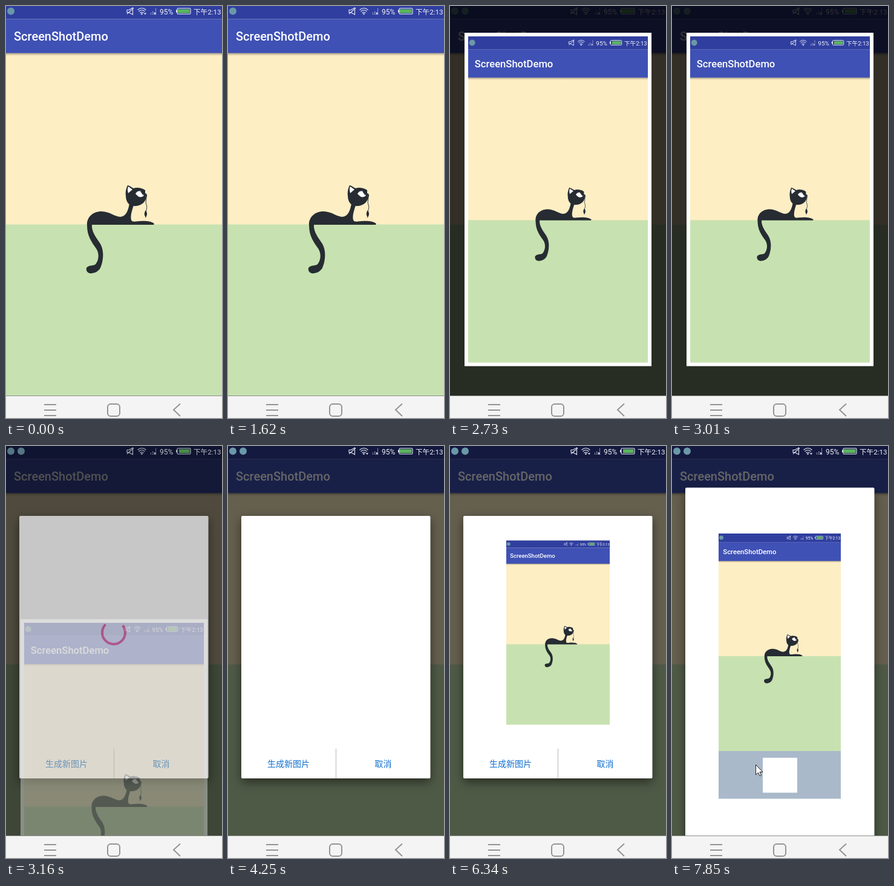
An HTML page that plays this animation: 357x678 px, repeating every 8 s.

```html
<!DOCTYPE html>
<html lang="zh">
<head>
<meta charset="utf-8">
<title>ScreenShotDemo</title>
<style>
  html, body { margin: 0; width: 100%; height: 100%; overflow: hidden; background: #f4f4f4; }
  svg { display: block; }
  text { font-family: Roboto, "Noto Sans CJK SC", "Noto Sans CJK", sans-serif; }
  .title { font-size: 20px; font-weight: 500; fill: #fff; }
  .small { font-size: 12px; fill: #f2f3fa; }
  .btn { font-size: 14px; fill: #0f6fd0; text-anchor: middle; }
  .line { fill: none; stroke: #e8eaf6; stroke-width: 1.1; }
  .nav { fill: none; stroke: #949494; stroke-width: 2; }
  #card { fill: #fff; filter: drop-shadow(0 6px 8px rgba(0, 0, 0, .5)); }
</style>
</head>
<body>
<svg width="357" height="678" viewBox="0 0 357 678">
  <defs>
    <linearGradient id="fade" x2="0" y2="1">
      <stop offset="0" stop-opacity=".32"/>
      <stop offset="1" stop-opacity="0"/>
    </linearGradient>

    <!-- The screen starts 4px above the stage; its screenshots show that strip. -->
    <g id="app">
      <rect y="-4" width="357" height="645" fill="#feeec4"/>
      <rect y="359.5" width="357" height="281.5" fill="#c7e2b0"/>
      <rect y="-4" width="357" height="25.5" fill="#303f9f"/>
      <rect y="21.5" width="357" height="56" fill="#3f51b5"/>
      <rect y="77.5" width="357" height="4.5" fill="url(#fade)"/>
      <text class="title" x="13" y="57">ScreenShotDemo</text>
      <g fill="#262c32">
        <path d="M134 361C133 348 143 338 158 338C171 338 180 347 189 347C199 346 202 336 204 325L212 325C209 334 205 345 207 352C208 355 211 355 215 354.5C228 353 241 354 245 358.500L244 360L142 360C141 371 149 381 155 390C163 402 161 420 156 431C152 438 145 440 139 440C134 439 132 435 133 431C136 426 144 428 148 425C153 419 155 408 149 399C142 389 134 379 134 361Z"/>
        <path d="M198 312C197 306 199 299 201 295C205 296 208 299 211 300C216 298 224 299 230 303L230 308C235 310 233 314 231 318C228 326 219 330 210 329C202 328 198 321 198 312Z"/>
        <path d="M231 336C228 340 228.500 344 230 346L230.500 349L232 346C234 343 233 339 231 336Z"/>
      </g>
      <path d="M202 297L209 302L202 308Q200 302 202 297Z" fill="#fff"/>
      <path d="M214 309Q218 302 226 306L228 312Q222 317 217 312Z" fill="#fff"/>
      <path d="M222 305L228 305L227 312Z" fill="#262c32"/>
      <path d="M231 311C234 318 229 322 232 327Q234 332 231 338" fill="none" stroke="#454b4e" stroke-width="1.1"/>
    </g>

    <g id="stat">
      <circle cx="8" cy="8.500" r="6" fill="#6b98a8"/>
      <path class="line" d="M200 6.500H203L209.500 3V14L203 10.500H200ZM200 13L211 3.500"/>
      <path class="line" d="M217.500 6.500Q224.500 .5 231.500 6.500M219.500 9Q224.500 4.500 229.500 9M221.500 11.500Q224.500 9 227.500 11.500"/>
      <circle cx="224.500" cy="13" r="1.2" fill="#fff"/>
      <path class="line" stroke-dasharray="1 1" d="M239.500 14V11M242.500 14V8M247.500 9V3"/>
      <path class="line" d="M244.500 10.500L248 14M248 10.500L244.500 14"/>
      <text class="small" x="254" y="13.500">95%</text>
      <rect class="line" x="283" y="3.800" width="22" height="9.400" rx="1.500"/>
      <rect x="281" y="6.500" width="2" height="4" fill="#e8eaf6"/>
      <rect x="286" y="5.300" width="17.500" height="6.400" fill="#5cb45f"/>
      <text class="small" x="310" y="13.500" style="font-size:11.6px">下午2:13</text>
    </g>

    <g id="snap"><use href="#app"/><use href="#stat"/></g>
  </defs>

  <use href="#app"/>
  <rect id="dim" width="357" height="641"/>
  <use href="#stat"/>
  <circle id="note" cx="25" cy="8.500" r="6" fill="#6b98a8"/>
  <path id="arrows" d="M228 11.500H232L230 14.500Z" fill="#e8eaf6"/>
  <rect id="charge" x="284" y="5.300" width="2" height="6.400" fill="#5cb45f"/>

  <g id="dialog">
    <rect id="card" x="22" width="312.500" rx="2"/>
    <g id="buttons">
      <path d="M178.500 498V547" stroke="#b9b9b0"/>
      <text class="btn" x="100" y="528">生成新图片</text>
      <text class="btn" x="256.500" y="528">取消</text>
    </g>
    <path id="spin" fill="none" stroke="#ff4081" stroke-width="4"/>
    <use id="thumb" href="#snap"/>
    <g id="footer">
      <rect x="77" y="502" width="202" height="78.500" fill="#a9b9ca"/>
      <rect x="150" y="513" width="57" height="57.500" fill="#fff"/>
    </g>
  </g>

  <rect id="scrim" width="357" height="641"/>
  <g id="shot">
    <rect id="frame" fill="#fff"/>
    <use id="photo" href="#snap"/>
  </g>
  <rect id="flash" width="357" height="641" fill="#fff"/>
  <path id="cursor" d="M0 0V16.500L4 13L6.500 18.500L9 17.500L6.500 12H11.500Z" fill="#fff" stroke="#222"/>

  <rect y="641" width="357" height="37" fill="#f4f4f4"/>
  <path d="M0 641.500H357" stroke="#8c8c88"/>
  <path class="nav" d="M63 656H83M63 665H83M63 674H83M288 654.500L277 664.500L288 675"/>
  <rect class="nav" x="168" y="655" width="20" height="20" rx="5"/>
</svg>

<script>
const LOOP = 8000;
const WIDTH = 357, HEIGHT = 645, TOP = 4;
const TICKS = [0, 150, 550, 670, 1050, 1620, 2050, 2450, 2580, 2730, 2880, 3020, 3160, 3280,
  3400, 3540, 3680, 3820, 3960, 4100, 4250, 4520, 4950, 5380, 5650, 5930, 6340, 6490, 6630,
  6770, 6910, 7050, 7190, 7330, 7450, 7650, 7850];
const BLINKS = [150, 550, 1050, 1620, 2050, 2450, 2880, 3400, 3820, 4250, 4520, 4950, 5380,
  5930, 6340, 6910, 7330, 7850];

const el = id => document.getElementById(id);
const set = (id, attrs) => {
  for (const key in attrs) el(id).setAttribute(key, attrs[key]);
};
const show = (id, on) => set(id, { visibility: on ? 'visible' : 'hidden' });
const ramp = (t, from, to) => Math.min(1, Math.max(0, (t - from) / (to - from)));
const smooth = u => u * u * (3 - 2 * u);
// Fits the whole screen, with its top strip, into a box.
const fit = (x, y, w, h) =>
  `translate(${x} ${y}) scale(${w / WIDTH} ${h / HEIGHT}) translate(0 ${TOP})`;

function drawShot(t) {
  const into = 1 - (1 - ramp(t, 2450, 2700)) ** 2;
  const out = ramp(t, 2900, 3324);
  const scale = 1 - .168 * into;
  const x = 30 * into, y = 54 * into - TOP + 641 * out * out;
  const w = WIDTH * scale, h = HEIGHT * scale;
  set('shot', { opacity: t < 2450 ? 0 : 1 - out });
  set('frame', { x: x - 6, y: y - 6, width: w + 12, height: h + 12 });
  set('photo', { transform: fit(x, y, w, h), opacity: 1 - out * out });
  set('scrim', { opacity: .8 * ramp(t, 2450, 2650) * (1 - out) ** 1.36 });
  set('flash', { opacity: t < 2450 ? 0 : .65 * (1 - ramp(t, 2450, 2700)) });
}

function drawSpinner(t) {
  show('spin', t >= 2900 && t < 4250);
  const u = ((t - 2493 + LOOP) % 1333) / 1333;
  const base = 52 + (t - 3160) * .162;
  const point = turn => {
    const a = (base + 360 * turn - 90) * Math.PI / 180;
    return `${178 + 19 * Math.cos(a)} ${307 + 19 * Math.sin(a)}`;
  };
  const head = .03 + .7 * smooth(ramp(u, 0, .5));
  const tail = .7 * smooth(ramp(u, .5, 1));
  set('spin', { d: `M${point(tail)}A19 19 0 ${head - tail > .5 ? 1 : 0} 1 ${point(head)}` });
}

function drawDialog(t) {
  const fade = ramp(t, 2880, 3050);
  const tall = t >= 7450;
  set('dim', { opacity: .6 * fade });
  set('dialog', { opacity: fade });
  set('card', tall ? { y: 68.5, height: 630 } : { y: 115, height: 432 });
  show('buttons', !tall);
  show('footer', tall);
  show('thumb', t >= 4520);
  set('thumb', { transform: tall ? fit(77, 144, 202, 358) : fit(93, 155.5, 171, 303) });
}

function draw(now) {
  const t = TICKS.findLast(tick => tick <= now);
  show('charge', BLINKS.filter(b => b <= t).length % 2 === 0);
  show('note', t >= 2450);
  show('arrows', t < 670 || t >= 3540);
  drawDialog(t);
  drawSpinner(t);
  drawShot(t);
  const move = smooth(ramp(t, 6450, 7150));
  show('cursor', t >= 6490);
  set('cursor', { transform: `translate(${316 - 177.5 * move} ${539 - 14.5 * move})` });
}

const start = performance.now();
function loop() {
  draw((performance.now() - start) % LOOP);
  requestAnimationFrame(loop);
}
loop();
</script>
</body>
</html>
```
